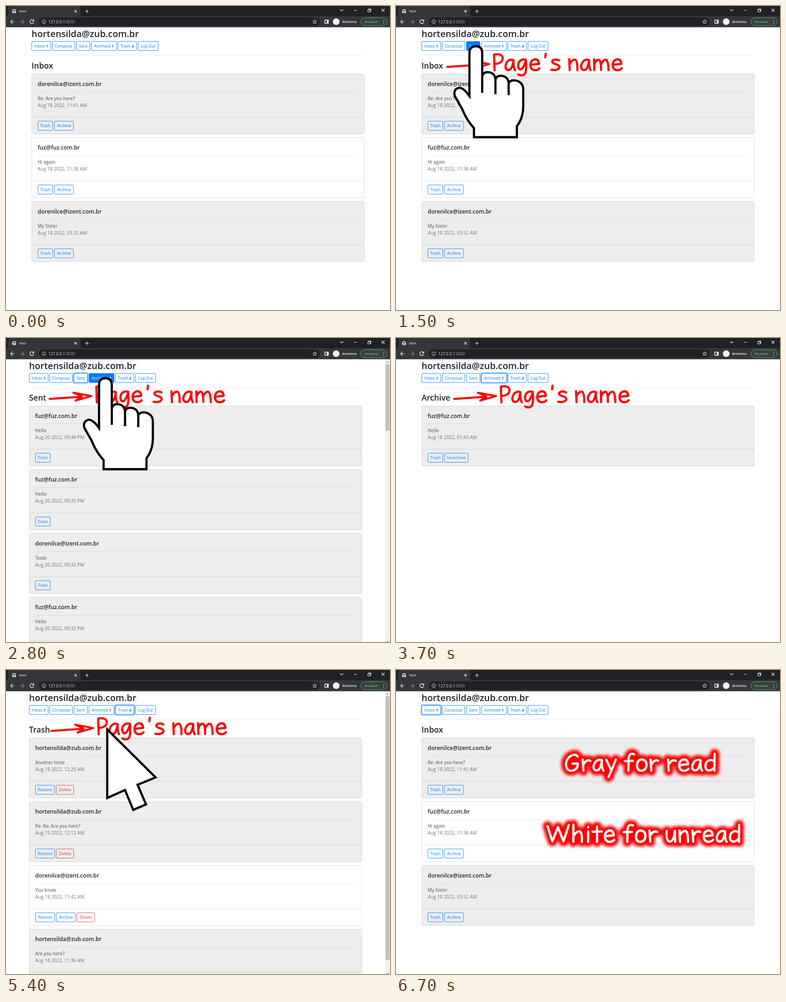
Write an HTML page that moves like this. It is 842 px wide and 665 px high and loops after 8.7 s.

```html
<!DOCTYPE html>
<html lang="en">
<head>
<meta charset="utf-8">
<title>Mail tour</title>
<style>
  html, body { margin: 0; width: 100%; height: 100%; overflow: hidden; background: #fff; }
  svg { display: block; width: 842px; height: 665px; font-family: "Open Sans", "Noto Sans", sans-serif; }
  .account { font-size: 19.9px; font-weight: 600; fill: #212529; }
  .heading { font-size: 17.5px; font-weight: 600; fill: #212529; }
  .sender { font-size: 12.3px; font-weight: 600; fill: #212529; }
  .subject { font-size: 9.8px; font-weight: 600; fill: #6c757d; }
  .date { font-size: 10.2px; fill: #6c757d; }
  .label { font-size: 8.8px; text-anchor: middle; }
  .bold { font-weight: 700; }
  .icon { fill: none; stroke: #e8eaed; stroke-width: 1.2; }
</style>
</head>
<body>
<svg id="stage" viewBox="0 0 842 665">
  <defs>
    <filter id="glow" x="-10%" y="-40%" width="120%" height="180%"><feGaussianBlur stdDeviation="3.2"/></filter>
  </defs>
  <g id="page"></g>
  <g id="browser">
    <rect width="842" height="23" fill="#202124"/>
    <path d="M0 22Q5 22 5 17V5Q5 0 10 0H158Q163 0 163 5V17Q163 22 168 22H842V46.500H0Z" fill="#35363a"/>
    <circle cx="18" cy="11.500" r="4.700" fill="#f1f3f4"/>
    <path d="M14 10Q17 10 18 12T17 16M18 7.500Q17 10 20 10T22.500 13" fill="none" stroke="#35363a" stroke-width="1.500"/>
    <text x="29" y="14" font-size="7.8" fill="#e8eaed">Mail</text>
    <path class="icon" d="M150 9L155 14M155 9L150 14M173.500 11.500H181.500M177.500 7.500V15.500"/>
    <path class="icon" d="M732.500 7.500L736 11L739.500 7.500M763 9.500H769.500M793.500 8H798.500V13H793.500ZM795 7.500V6.500H800V11.500H799M823.500 6L830 12.500M830 6L823.500 12.500"/>
    <path class="icon" d="M19 34.500H10.500M14.500 30L10 34.500L14.500 39"/>
    <path class="icon" style="stroke:#85878b" d="M31 34.500H39.500M35.500 30L40 34.500L35.500 39"/>
    <path class="icon" style="stroke-width:1.500" d="M60 31.500A4.200 4.200 0 1 0 60.700 35.500"/>
    <path d="M61.500 29V33.500H57Z" fill="#e8eaed"/>
    <rect x="72" y="25" width="616" height="18.500" rx="9.250" fill="#202124"/>
    <circle class="icon" style="stroke-width:.9" cx="83" cy="34.500" r="4.200"/>
    <path class="icon" d="M83 32V33M83 34V37"/>
    <text x="93" y="37.500" font-size="8.6" fill="#e8eaed">127.0.0.1<tspan fill="#9aa0a6">:8000</tspan></text>
    <path class="icon" style="stroke-width:1" d="M677 30L678.300 33L681.300 33.200L679 35.300L679.700 38.300L677 36.700L674.300 38.300L675 35.300L672.700 33.200L675.700 33Z"/>
    <path d="M698.500 30H707.500V38.500H698.500ZM700 31.500V37H703.500V31.500Z" fill="#f1f3f4" fill-rule="evenodd"/>
    <circle cx="724" cy="34.300" r="7.300" fill="#f1f3f4"/>
    <text x="737" y="37" font-size="7.3" font-weight="600" fill="#f1f3f4">Anônima</text>
    <rect x="778" y="25.500" width="58" height="17.500" rx="8.750" fill="#36423c" stroke="#5f9f78"/>
    <text x="786" y="37" font-size="7.6" fill="#81c995">Atualizar</text>
    <path d="M828 31V39" stroke="#81c995" stroke-width="1.800" stroke-dasharray="1.600 1.600"/>
  </g>
  <g id="notes"></g>
</svg>
<script>
const LOOP = 8700, STEP = 100;
const BLUE = '#007bff', RED = '#dc3545';
const OWNER = 'hortensilda@zub.com.br', FRIEND = 'dorenilce@izent.com.br', COUSIN = 'fuz@fuz.com.br';
const BUTTON_WIDTH = { Trash: 32.5, Archive: 42, Unarchive: 52, Restore: 42, Delete: 38.5 };

const NAV = [
  { x: 56.5, w: 41.5, label: 'Inbox', count: 1 },
  { x: 101.5, w: 49.5, label: 'Compose' },
  { x: 154.5, w: 29.5, label: 'Sent' },
  { x: 187.5, w: 55, label: 'Archived', count: 1 },
  { x: 245.5, w: 40.5, label: 'Trash', count: 4 },
  { x: 289.5, w: 44, label: 'Log Out' },
];

const mail = (from, subject, date, buttons, unread = false) => ({ from, subject, date, buttons: buttons.split(' '), unread });
const PAGES = {
  Inbox: [
    mail(FRIEND, 'Re: Are you here?', 'Aug 18 2022, 11:41 AM', 'Trash Archive'),
    mail(COUSIN, 'Hi again', 'Aug 18 2022, 11:38 AM', 'Trash Archive', true),
    mail(FRIEND, 'My Sister', 'Aug 18 2022, 03:32 AM', 'Trash Archive'),
  ],
  Sent: [
    mail(COUSIN, 'Hello', 'Aug 20 2022, 09:48 PM', 'Trash'),
    mail(COUSIN, 'Hello', 'Aug 20 2022, 09:35 PM', 'Trash'),
    mail(FRIEND, 'Teste', 'Aug 20 2022, 09:32 PM', 'Trash'),
    mail(COUSIN, 'Hello', 'Aug 20 2022, 09:32 PM', 'Trash'),
  ],
  Archive: [mail(COUSIN, 'Hello', 'Aug 18 2022, 01:43 AM', 'Trash Unarchive')],
  Trash: [
    mail(OWNER, 'Another teste', 'Aug 19 2022, 12:25 AM', 'Restore Delete'),
    mail(OWNER, 'Re: Re: Are you here?', 'Aug 19 2022, 12:12 AM', 'Restore Delete'),
    mail(FRIEND, 'You know', 'Aug 18 2022, 11:42 AM', 'Restore Archive Delete', true),
    mail(OWNER, 'Are you here?', 'Aug 18 2022, 11:36 AM', 'Restore Delete'),
  ],
};

// thumb: bottom of the scrollbar thumb; path: one cursor position per step
const SCENES = [
  { start: 0, page: 'Inbox', arrow: 500, text: 600, dx: 0, cursor: 1200, next: 2,
    path: [[369, 124.5], [304, 113], [240, 101], [175, 85]] },
  { start: 1700, page: 'Sent', focus: 2, thumb: 203, arrow: 2200, text: 2400, dx: -17, cursor: 2600, next: 3,
    path: [[215, 130], [216, 110], [218, 85]] },
  { start: 3000, page: 'Archive', focus: 3, arrow: 3500, text: 3700, dx: 15, cursor: 3900, next: 4,
    path: [[264, 112], [264, 103], [267, 90], [264, 85]] },
  { start: 4400, page: 'Trash', focus: 4, thumb: 635, arrow: 4900, text: 5100, dx: -13, cursor: 5300, next: 0,
    path: [[264, 130], [222, 130], [185, 122], [148, 112], [112, 101], [76, 85]] },
  { start: 6000, page: 'Inbox', focus: 0, gray: 6500, white: 6700 },
];

// Rounded handwriting: advance and pen strokes, in hundredths of an em
const PEN = {
  P: [52, 'M12-2L10-70Q47-76 47-53Q44-31 11-30'],
  G: [68, 'M57-62Q50-72 36-68Q8-56 9-26Q12-2 32-3Q58-6 58-33L36-32'],
  W: [104, 'M8-68L28-5L51-64L74-5L96-72'],
  a: [53, 'M41-46Q28-52 17-42Q4-26 8-12Q14 0 27-6Q37-14 42-46Q39-16 48-3'],
  d: [59, 'M47-73L46-3M46-42Q28-54 13-38Q4-18 14-7Q30 2 46-18'],
  e: [55, 'M9-26L45-30Q44-50 27-50Q8-46 8-24Q10-3 28-3Q40-3 47-11'],
  f: [51, 'M46-71Q24-80 23-50L22-3M7-43L41-44'],
  g: [53, 'M42-47Q24-54 12-38Q4-20 14-8Q28 0 42-44Q45 0 38 12Q26 25 9 15'],
  h: [58, 'M11-74L11-3M12-26Q26-50 38-46Q48-40 46-3'],
  i: [28, 'M14-46L14-3M14-64L14-63'],
  m: [82, 'M10-50L11-3M11-28Q18-48 30-48Q40-46 40-4M40-28Q50-50 61-48Q71-44 72-3'],
  n: [54, 'M10-50L12-3M11-28Q22-50 35-48Q46-44 45-3'],
  o: [53, 'M26-50Q7-48 7-24Q8-3 26-3Q45-5 46-27Q46-48 26-50'],
  r: [48, 'M10-49L13-3M12-26Q24-52 42-44'],
  s: [50, 'M41-45Q24-54 12-44Q7-34 25-29Q46-24 41-12Q30 0 7-5'],
  t: [47, 'M23-66L23-3M5-45L42-46'],
  u: [52, 'M9-48Q6-4 22-4Q38-4 43-48L44-3'],
  y: [52, 'M7-48L25-10M46-49Q32-12 16 23'],
  "'": [36, 'M19-74L17-58'],
  ' ': [24, ''],
};

const text = (x, y, cls, body) => `<text x="${x}" y="${y}" class="${cls}">${body}</text>`;
const line = (x1, x2, y, color = 'rgba(0,0,0,.1)') => `<path d="M${x1} ${y}H${x2}" stroke="${color}" stroke-width=".8"/>`;

function button(x, y, w, label, { color = BLUE, filled = false, focused = false } = {}) {
  const ring = focused ? `<rect x="${x - 1.2}" y="${y - 1.2}" width="${w + 2.4}" height="22.4" rx="2.500" fill="none" stroke="${BLUE}" stroke-opacity=".5" stroke-width="2"/>` : '';
  return `${ring}<rect x="${x}" y="${y}" width="${w}" height="20" rx="2" fill="${filled ? color : 'none'}" stroke="${color}" stroke-width=".9"/>
    <g fill="${filled ? '#fff' : color}">${text(x + w / 2, y + 13.3, 'label', label)}</g>`;
}

function card({ from, subject, date, buttons, unread }, i) {
  let x = 70;
  const actions = buttons.map(name => {
    const w = BUTTON_WIDTH[name];
    const out = button(x, 252, w, name, { color: name === 'Delete' ? RED : BLUE });
    x += w + 3.6;
    return out;
  }).join('');
  return `<g transform="translate(0 ${i * 139.5})">
    <rect x="56.500" y="148.500" width="729" height="131.500" rx="2.500" fill="${unread ? '#fff' : '#ededed'}" stroke="rgba(0,0,0,.15)" stroke-width=".9"/>
    ${text(69.5, 174.5, 'sender', from)}${line(70, 772, 188)}
    ${text(69.5, 205.5, 'subject', subject)}${text(69.5, 220.7, 'date', date)}
    ${line(56.5, 785.5, 243.3, 'rgba(0,0,0,.14)')}${actions}</g>`;
}

function scrollbar(bottom) {
  return `<rect x="831" y="46" width="11" height="619" fill="#f1f1f1"/>
    <rect x="832" y="57.500" width="9" height="${bottom - 57.5}" fill="#c1c1c1"/>
    <path d="M833.500 54L836.500 51L839.500 54Z" fill="#a3a3a3"/><path d="M833.500 664L836.500 667L839.500 664Z" fill="#505050"/>`;
}

function drawPage({ page, focus, thumb }, hovered) {
  const nav = NAV.map(({ x, w, label, count }, i) =>
    button(x, 77.4, w, count ? `${label} <tspan class="bold">${count}</tspan>` : label,
      { filled: i === hovered, focused: i === focus })).join('');
  return `<rect width="842" height="665" fill="#fff"/>
    <g transform="translate(${thumb ? -5.5 : 0} 0)">
      ${text(56, 67.5, 'account', OWNER)}${nav}${line(56, 786, 107.8)}
      ${text(56, 137, 'heading', page)}${PAGES[page].map(card).join('')}
    </g>${thumb ? scrollbar(thumb) : ''}`;
}

function handwriting(words, x, y, scale, color, glow) {
  let pen = 0;
  const strokes = [...words].map(ch => {
    const [advance, d] = PEN[ch];
    const out = `<path d="${d}" transform="translate(${pen} 0)"/>`;
    pen += advance;
    return out;
  }).join('');
  const layer = (stroke, width) => `<g stroke="${stroke}" stroke-width="${width}" transform="translate(${x} ${y}) scale(${scale})">${strokes}</g>`;
  return `<g role="img" aria-label="${words}" fill="none" stroke-linecap="round" stroke-linejoin="round">
    ${glow ? `<g filter="url(#glow)">${layer('red', 40)}</g>` : ''}${layer(color, 9.4)}</g>`;
}

const redArrow = () => `<g transform="translate(204.500 127)" fill="none" stroke="red" stroke-linejoin="round" stroke-linecap="round">
  <path d="M-92 6.200L-22 1.500" stroke-width="4.400"/><path d="M-40-7.500L0 0L-35 10L-21 1Z" stroke-width="4.200"/></g>`;

function cursor([x, y], isHand) {
  const shape = isHand
    ? `M-14 18Q-14 3 0 3Q14 3 14 18V70Q16 58 29 60Q42 62 43 76Q46 66 58 68Q71 70 72 84Q76 76 88 78Q104 82 104 98V135
       Q104 160 90 178V202H-4V182Q-20 165 -30 140L-46 112Q-50 98 -38 94Q-28 92 -14 112ZM14 70V105M43 76V108M72 84V110`
    : 'M0 0V150L39 132.500L57 176L85 164L66.500 121L106 105Z';
  return `<path d="${shape}" transform="translate(${x} ${y})" fill="#fff" stroke="#000" stroke-width="4.800"/>`;
}

const pageLayer = document.getElementById('page');
const noteLayer = document.getElementById('notes');
let shown = -1;

function render(time) {
  const t = Math.floor(time % LOOP / STEP) * STEP;
  if (t === shown) return;
  shown = t;
  const scene = SCENES.findLast(s => s.start <= t);
  const step = Math.floor((t - scene.cursor) / STEP);
  const point = step >= 0 ? scene.path[Math.min(step, scene.path.length - 1)] : null;
  const isHand = point !== null && point[1] < 98;

  pageLayer.innerHTML = drawPage(scene, isHand ? scene.next : -1);
  let notes = '';
  if (t >= scene.arrow) notes += redArrow();
  if (t >= scene.text) notes += handwriting("Page's name", 210, 142, 0.51, 'red');
  notes = `<g transform="translate(${scene.dx || 0} 0)">${notes}</g>`;
  if (t >= scene.gray) notes += handwriting('Gray for read', 368, 222, 0.53, '#ededed', true);
  if (t >= scene.white) notes += handwriting('White for unread', 328, 377.5, 0.53, '#fff', true);
  if (point) notes += cursor(point, isHand);
  noteLayer.innerHTML = notes;
}

const origin = performance.now();
function tick() {
  render(performance.now() - origin);
  requestAnimationFrame(tick);
}
tick();
</script>
</body>
</html>
```
